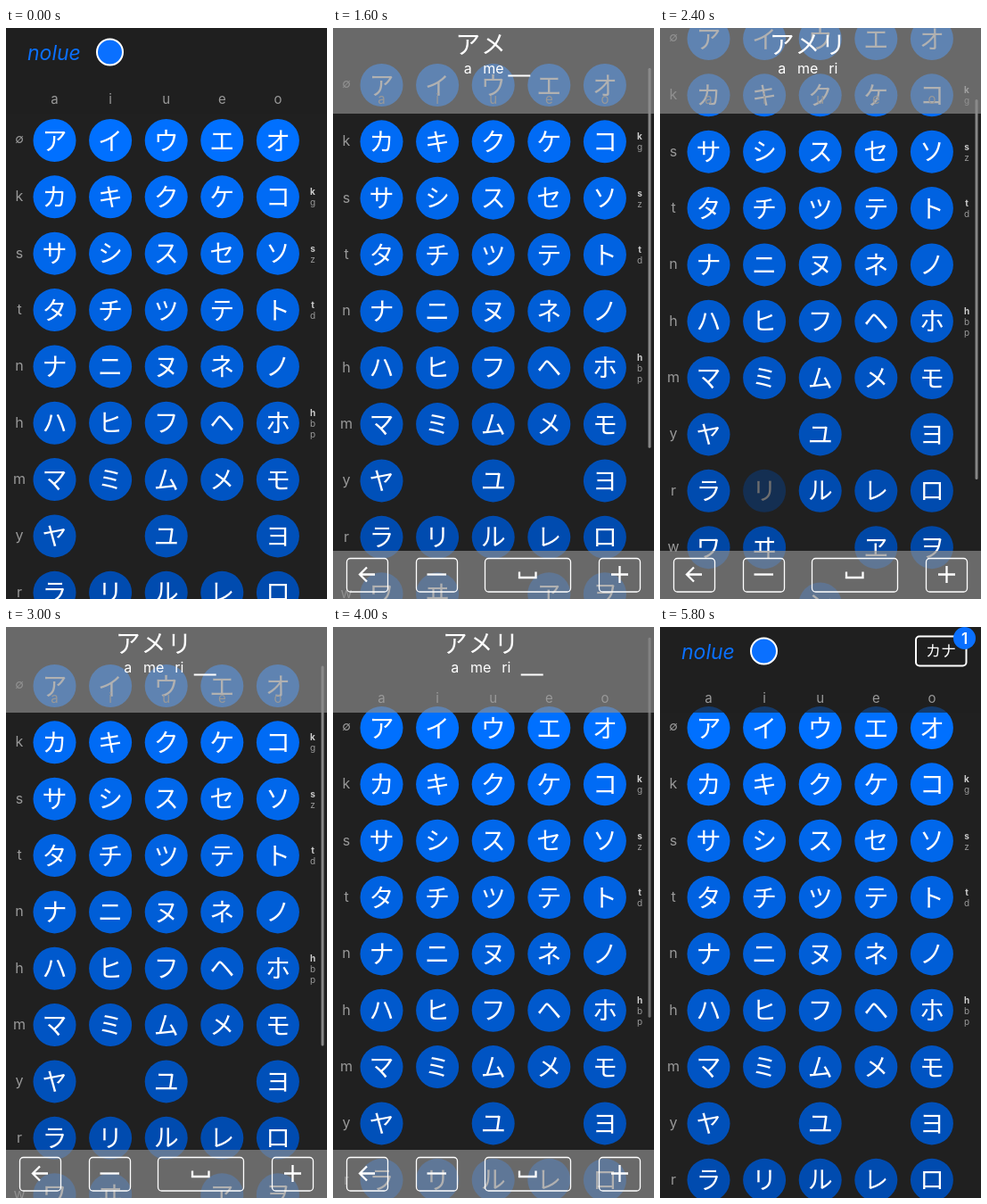
Write an HTML page that moves like this. It is 360 px wide and 640 px high and loops after 6000 ms.

```html
<!DOCTYPE html>
<html lang="ja">
<head>
<meta charset="utf-8">
<style>
  html, body { margin: 0; width: 100%; height: 100%; overflow: hidden; background: #202020; }
  svg { display: block; width: 100vw; height: 100vh; }
  text { font-family: Inter, Roboto, sans-serif; text-anchor: middle; }
  .kana { font-family: "Noto Sans CJK JP", "Noto Sans CJK", sans-serif; fill: #fff; }
</style>
</head>
<body>
<svg id="stage" viewBox="0 0 360 640"></svg>
<script>
const stage = document.getElementById('stage');
const BLUE = '#0a70ff', GRAY = '#999', LOOP = 6000, STEP = 200;
const CELL = 28.8, PITCH = 63.35, TOP = 126;
const colX = c => 54.5 + 62.6 * c;

function set(el, attrs) {
  for (const k in attrs) el.setAttribute(k, attrs[k]);
  return el;
}
function add(parent, tag, attrs, content) {
  const el = set(document.createElementNS('http://www.w3.org/2000/svg', tag), attrs);
  if (content) el.textContent = content;
  return parent.appendChild(el);
}
const group = (parent = stage) => add(parent, 'g', {});
const label = (parent, str, x, y, size, fill, more) =>
  add(parent, 'text', { x, y, 'font-size': size, fill, ...more }, str);
// Katakana centred on x, y
const kana = (parent, str, x, y, size) =>
  add(parent, 'text', { class: 'kana', x, y: y + size * 0.38, 'font-size': size }, str);

// Scrolling chart
const rows = [
  ['∅', 'アイウエオ'], ['k', 'カキクケコ', 'kg'], ['s', 'サシスセソ', 'sz'],
  ['t', 'タチツテト', 'td'], ['n', 'ナニヌネノ'], ['h', 'ハヒフヘホ', 'hbp'],
  ['m', 'マミムメモ'], ['y', 'ヤ ユ ヨ'], ['r', 'ラリルレロ'],
  ['w', 'ワヰ ヱヲ'], ['', '  ン']
];
const chart = group(), keys = {};
rows.forEach(([name, chars, voiced = ''], r) => {
  const y = TOP + PITCH * r;
  label(chart, name, 15, r ? y + 5 : y + 3, r ? 16 : 14, GRAY);
  [...chars].forEach((ch, c) => {
    if (ch === ' ') return;
    const key = keys[ch] = group(chart);
    add(key, 'circle', { cx: colX(c), cy: y, r: 24, fill: `rgb(0,${112 - 4.6 * r},${255 - 10 * r})` });
    kana(key, ch, colX(c), y, 28);
  });
  [...voiced].forEach((ch, i) =>
    label(chart, ch, 344, y + 4 + 12 * i - 6 * (voiced.length - 1), 10,
      i ? GRAY : '#ccc', { 'font-weight': i ? 400 : 700 }));
});
const scrollbar = add(stage, 'rect', { x: 353.5, width: 3, height: 426, rx: 1.5, fill: '#aaa' });

// Home header
const home = group();
add(home, 'rect', { width: 360, height: 96, fill: '#202020', opacity: 0.65 });
label(home, 'nolue', 24, 35.5, 23, BLUE, { style: 'text-anchor:start;font-style:italic' });
add(home, 'circle', { cx: 116.5, cy: 27, r: 14.5, fill: BLUE, stroke: '#fff', 'stroke-width': 2 });
const saved = group(home);
add(saved, 'rect', { x: 287, y: 10.5, width: 56.5, height: 33, rx: 4, fill: 'none', stroke: '#fff', 'stroke-width': 2 });
kana(saved, 'カナ', 315, 27, 17);
const badge = group(saved);
add(badge, 'circle', { r: 12.5, fill: BLUE });
label(badge, '1', 0, 6, 17, '#fff', { 'font-weight': 600 });

// Typing panels
const panel = group();
const veil = { width: 360, fill: '#8c8c8c', opacity: 0.68 };
add(panel, 'rect', { ...veil, height: 96 });
add(panel, 'rect', { ...veil, y: 586, height: 54 });
const word = [['ア', 'a', 400], ['メ', 'me', 1200], ['リ', 'ri', 2400], ['カ', 'ka', 4200]];
const cells = word.map(([ch, sound]) => {
  const cell = group(panel);
  kana(cell, ch, 0, 18, 28);
  label(cell, sound, 0, 51, 16, '#fff');
  return cell;
});
const cursor = add(panel, 'rect', { y: 52.5, width: 25, height: 2, fill: '#fff' });
const buttons = [
  [15.5, 46, 'M47 612.5H30M38 604.5L30 612.5L38 620.5'],
  [93.5, 46, 'M105.5 612.5H127'],
  [170.5, 96, 'M209 609.5V616H227.5V609.5'],
  [298.5, 46, 'M312 612.5H331M321.5 603V622']
].map(([x, width, d]) => {
  const button = group(panel);
  const line = { fill: 'none', stroke: '#fff' };
  add(button, 'rect', { x, y: 594.5, width, height: 37.5, rx: 4, 'stroke-width': 1.3, ...line });
  add(button, 'path', { d, 'stroke-width': 2.3, ...line });
  return button;
});

['a', 'i', 'u', 'e', 'o'].forEach((ch, c) => label(stage, ch, colX(c), 84.5, 15, GRAY));

// Piecewise linear value at time t
function track(t, points) {
  let [t0, v0] = points[0];
  for (const [t1, v1] of points) {
    if (t < t1) return v0 + (v1 - v0) * Math.max(0, (t - t0) / (t1 - t0));
    [t0, v0] = [t1, v1];
  }
  return v0;
}
const scrollPath = [[1200, 0], [1400, 15], [1600, 62], [1800, 97.5], [2000, 110], [2200, 114],
  [2600, 114], [2800, 95], [3000, 60], [3200, 28], [3400, 13.6], [3600, 13]];

function draw(t) {
  const scroll = track(t, scrollPath);
  set(chart, { transform: `translate(0 ${-scroll})` });
  set(scrollbar, {
    y: 3 + 0.675 * scroll,
    opacity: track(t, [[1200, 0], [1400, 0.75], [3600, 0.75], [4800, 0.2], [5000, 0]])
  });

  const open = track(t, [[400, 0], [800, 1], [5000, 1], [5600, 0]]);
  set(panel, { opacity: open });
  set(home, { opacity: 1 - open });
  set(saved, { opacity: t < 5000 ? 0 : 1 });
  set(badge, { transform: `translate(341.5 12.5) scale(${track(t, [[5200, 0], [5600, 1]])})` });
  set(buttons[3], { opacity: t === 5000 ? 0.4 : 1 });

  const count = word.filter(w => t >= w[2]).length;
  const cellX = i => 180 + (i - count / 2) * CELL;
  word.forEach(([ch, , at], i) => {
    set(keys[ch], { opacity: t < at ? 1 : track(t, [[at, 0.35], [at + 400, 1]]) });
    set(cells[i], { transform: `translate(${cellX(i)} 0)`, opacity: i < count ? 1 : 0 });
  });
  const idle = count ? t - word[count - 1][2] : 0;
  set(cursor, { x: cellX(count) - 12.5, opacity: idle % 1200 < 400 ? 0 : 1 });
}

const start = performance.now();
function tick() {
  const t = (performance.now() - start) % LOOP;
  draw(Math.floor(t / STEP) * STEP);
  requestAnimationFrame(tick);
}
tick();
</script>
</body>
</html>
```
